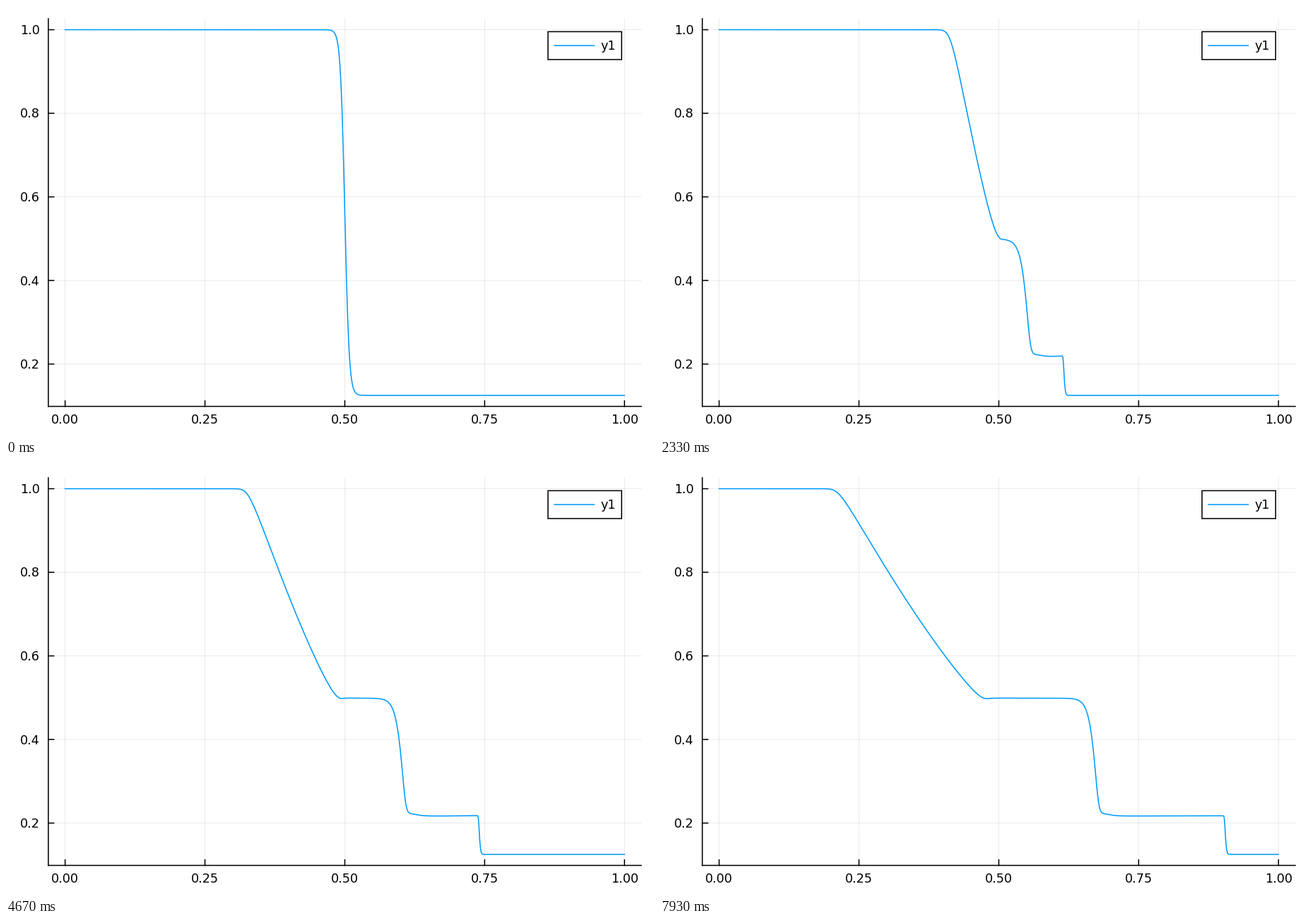
Recreate the animation shown at these times as a matplotlib script. Size 917 px wide and 611 px high, loop 8 s.

```python
import numpy as np
import matplotlib.pyplot as plt
from matplotlib.animation import FuncAnimation
from matplotlib.patches import Rectangle

W, H, DPI = 917, 611, 64
PT = 72 / DPI                      # points per pixel
FRAMES, LOOP = 120, 8000

# Shock tube: smoothed jump at the middle, gas at rest
GAMMA = 1.72
P_RIGHT, RHO_RIGHT = 0.1107, 0.125
WIDTH = 0.0078
CELLS, STEPS, DT = 500, 8, 0.0018


def viscosity(rho, p, dv):
    """Artificial pressure, active only in compression."""
    dv = np.minimum(dv, 0)
    sound = np.sqrt(GAMMA * p / rho)
    return rho * (1.5 * dv ** 2 - 0.25 * sound * dv)


def simulate():
    """Lagrangian gas dynamics; returns one (x, density) curve per frame."""
    x = np.linspace(0, 1, CELLS + 1)
    mid = (x[1:] + x[:-1]) / 2
    left = 0.5 - 0.5 * np.tanh((mid - 0.5) / WIDTH)
    rho = RHO_RIGHT + (1 - RHO_RIGHT) * left
    p = P_RIGHT + (1 - P_RIGHT) * left
    mass = rho * np.diff(x)
    node_mass = (mass[1:] + mass[:-1]) / 2
    energy = p / ((GAMMA - 1) * rho)
    v = np.zeros(CELLS + 1)
    q = np.zeros(CELLS)
    dt = DT / STEPS
    curves = []
    for _ in range(FRAMES):
        mid = (x[1:] + x[:-1]) / 2
        curves.append((np.r_[0, mid, 1], np.r_[rho[0], rho, rho[-1]]))
        for _ in range(STEPS):
            v[1:-1] -= dt * np.diff(p + q) / node_mass
            x = x + dt * v
            new = mass / np.diff(x)
            dvol = 1 / new - 1 / rho
            q = viscosity(new, p, np.diff(v))
            energy = ((energy - (p / 2 + q) * dvol)
                      / (1 + (GAMMA - 1) * new * dvol / 2))
            rho = new
            p = (GAMMA - 1) * rho * energy
    return curves


def px(x):
    return 83.65 + 791.6 * np.asarray(x)


def py(y):
    return 33.6 + 592.5 * (1 - np.asarray(y))


fig = plt.figure(figsize=(W / DPI, H / DPI), dpi=DPI, facecolor="white")
ax = fig.add_axes([0, 0, 1, 1])
ax.set(xlim=(0, W), ylim=(H, 0))
ax.axis("off")

LEFT, RIGHT, TOP, BOTTOM = 59.9, 899, 18, 567.6
BLUE = "#009afa"


def stroke(xs, ys, color="black", width=1.55, **kw):
    return ax.plot(xs, ys, color=color, lw=width * PT, snap=False, **kw)[0]


def label(x, y, text, ha):
    ax.text(x, y, text, ha=ha, va="baseline", family="DejaVu Sans",
            fontsize=17.6 * PT)


for t in (0, 0.25, 0.5, 0.75, 1):
    x = px(t)
    stroke([x, x], [TOP, BOTTOM], width=0.8, alpha=0.1)
    stroke([x, x], [BOTTOM, BOTTOM - 7.8])
    label(x, 591.5, f"{t:.2f}", "center")
for t in (0.2, 0.4, 0.6, 0.8, 1):
    y = py(t)
    stroke([LEFT, RIGHT], [y, y], width=0.8, alpha=0.1)
    stroke([LEFT, LEFT + 7.8], [y, y])
    label(47.7, y + 6.4, f"{t:.1f}", "right")
stroke([LEFT, LEFT], [TOP, BOTTOM], solid_capstyle="projecting")
stroke([LEFT, RIGHT], [BOTTOM, BOTTOM], solid_capstyle="projecting")

curve = stroke([], [], BLUE, solid_joinstyle="round", zorder=3)

ax.add_patch(Rectangle((767, 36.4), 104.2, 39.5, fc="white", ec="black",
                       lw=1.55 * PT, snap=False, zorder=4))
stroke([776, 832.5], [56.1, 56.1], BLUE, zorder=5)
ax.text(841, 62.5, "y1", family="DejaVu Sans", fontsize=17.6 * PT,
        va="baseline", zorder=5)

curves = simulate()


def update(i):
    x, rho = curves[i]
    curve.set_data(px(x), py(rho))
    return (curve,)


anim = FuncAnimation(fig, update, frames=FRAMES, interval=LOOP / FRAMES,
                     repeat=True, repeat_delay=0)
plt.show()
```
